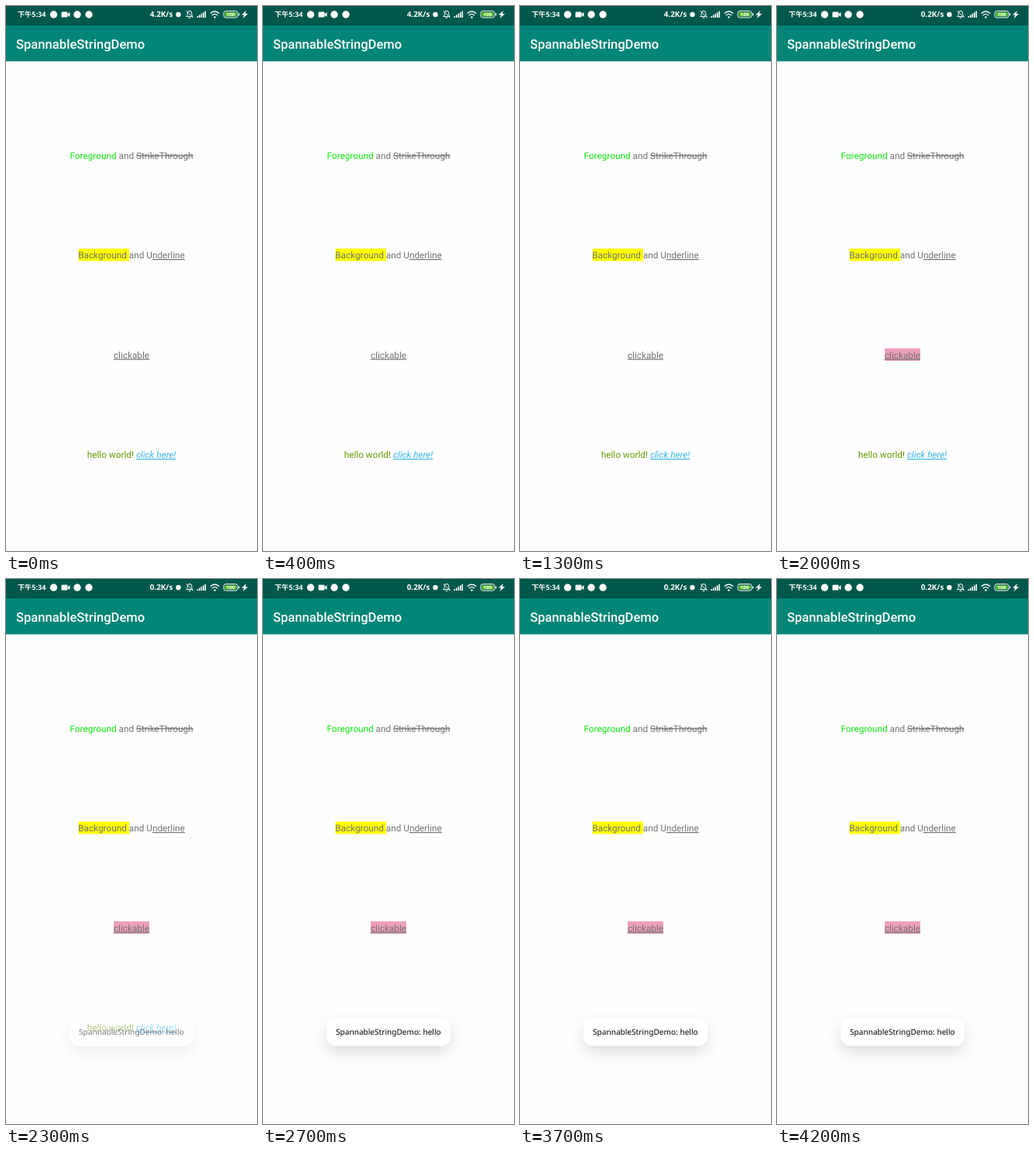
An HTML page for the animation above (4.3 s loop, 324 by 702 pixels).

```html
<!DOCTYPE html>
<html lang="en">
<head>
<meta charset="utf-8">
<title>SpannableStringDemo</title>
<style>
  html, body { margin: 0; width: 100%; height: 100%; overflow: hidden; background: #fefefe; }
  svg { display: block; width: 324px; height: 702px; }
  text { white-space: pre; text-rendering: geometricPrecision; }
  .body { font: 11.8px Roboto, sans-serif; fill: #737373; text-anchor: middle; }
  .title { font: 500 16.6px Roboto, sans-serif; fill: #fff; }
  .status { font: 600 9.9px "Noto Sans", "Noto Sans CJK SC", sans-serif; fill: #fff; }
  .toast { font: 10.1px "Noto Sans", sans-serif; fill: #000; }
  .under { text-decoration: underline 0.8px; text-underline-offset: 1px; text-decoration-skip-ink: none; }
  .strike { text-decoration: line-through; }
  .line { fill: none; stroke: #fff; stroke-linecap: round; stroke-linejoin: round; }
  .green { fill: #0ce80c; }
  .olive { fill: #690; }
  .link { fill: #33b5e5; font-style: italic; }
  #card { filter: drop-shadow(0 8px 9px rgba(0, 0, 0, .13)); }
</style>
</head>
<body>
<svg viewBox="0 0 324 702">
  <rect width="324" height="71.3" fill="#008577"/>
  <rect width="324" height="25" fill="#00574b"/>

  <!-- status bar -->
  <text class="status" x="15" y="14" style="font-size:9.1px">下午5:34</text>
  <text class="status" id="speed" x="185.7" y="14.3">4.2K/s</text>
  <g fill="#fff">
    <circle cx="61.5" cy="11" r="4.7"/>
    <rect x="71.5" y="7.5" width="8" height="7" rx="1.2"/>
    <path d="M79.5 10.3l3-2.3v6l-3-2.3z"/>
    <circle cx="92" cy="11" r="4.7"/>
    <circle cx="107" cy="11" r="4.7"/>
    <circle cx="222.5" cy="11" r="3.2"/>
    <path id="bars"/>
    <circle cx="269.5" cy="14.5" r="1.2"/>
    <path d="M310 6l-6 5.5h3.3l-1.5 4.5 6.5-6h-3.3z"/>
  </g>
  <path class="line" d="M233 13.5h8c-1.5-1.5-1-3-1.3-4.5a2.7 2.7 0 0 0-5.4 0c-.3 1.5.2 3-1.3 4.5M236 15.3h2M233 6.5l8.5 8.5"/>
  <path class="line" stroke-width="1.3" d="M264.2 9.3q5.3-4.6 10.6 0M266.3 11.8q3.2-2.7 6.4 0"/>
  <rect class="line" x="281" y="6.5" width="18" height="8.5" rx="2.8"/>
  <rect x="282.5" y="8" width="15" height="5.5" rx="1.5" fill="#5fc52e"/>
  <path class="line" stroke-width="1.2" d="M300.7 9.5v2.5"/>
  <text class="status" x="290" y="13" text-anchor="middle" style="font-size:6px">100</text>

  <text class="title" x="13" y="55">SpannableStringDemo</text>

  <rect x="93.5" y="312.5" width="65.5" height="16" fill="#ff0"/>
  <rect id="press" x="139" y="441" width="46" height="16" fill="#ee9fbb"/>

  <text class="body" x="162" y="196.5"><tspan class="green">Foreground</tspan> and <tspan class="strike">StrikeThrough</tspan></text>
  <text class="body" x="162" y="325">Background and U<tspan class="under">nderline</tspan></text>
  <text class="body" x="162" y="453.6">
    <tspan class="under" x="162">clickable</tspan></text>
  <text class="body" x="162" y="582.2"><tspan class="olive">hello world! </tspan><tspan class="under link">click here!</tspan></text>

  <g id="toast">
    <rect id="card" x="82" y="565.5" width="160" height="36" rx="12" fill="#fff"/>
    <text class="toast" x="94" y="587.3">SpannableStringDemo: hello</text>
  </g>
</svg>
<script>
  const LOOP = 4300, SPEED_AT = 1800, PRESS_AT = 1900, TOAST_AT = 2200, FADE = 200;
  const el = id => document.getElementById(id);
  const clamp = v => Math.max(0, Math.min(1, v));

  // signal bars grow to the right
  el('bars').setAttribute('d', [0, 1, 2, 3, 4]
    .map(i => `M${246.5 + i * 2.5} 15v${-2 - i * 1.6}h1.6V15z`).join(''));

  function draw() {
    const t = performance.now() % LOOP;
    el('speed').textContent = t < SPEED_AT ? '4.2K/s' : '0.2K/s';
    el('press').style.opacity = t < PRESS_AT ? 0 : 1;
    el('toast').style.opacity = clamp((t - TOAST_AT) / FADE);
    requestAnimationFrame(draw);
  }
  draw();
</script>
</body>
</html>
```
